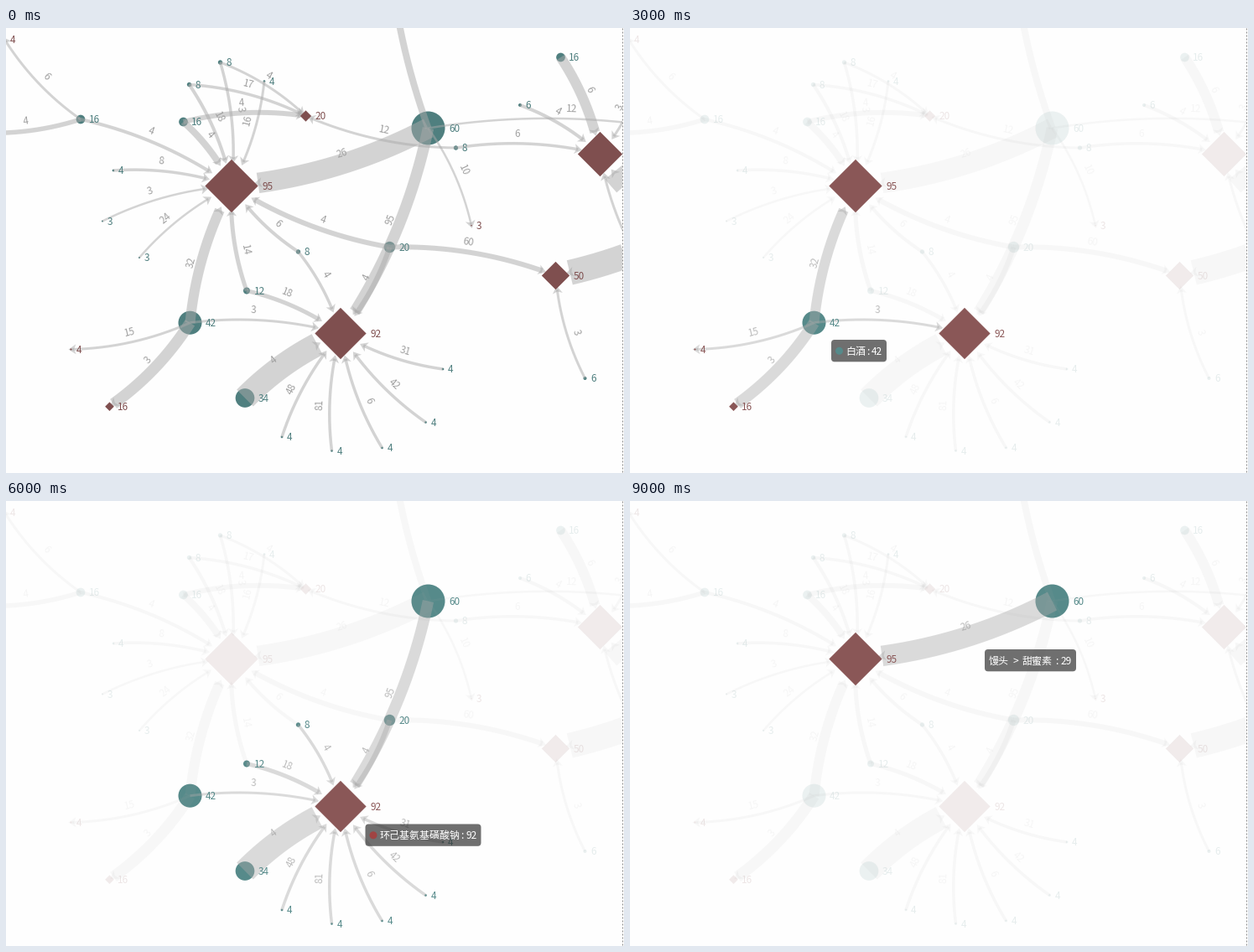
A matplotlib script for the animation above (10 s loop, 737 by 531 pixels).

```python
import numpy as np
import matplotlib.pyplot as plt
from matplotlib.animation import FuncAnimation
from matplotlib.patches import Circle, FancyBboxPatch, Polygon, Rectangle

W, H, DPI = 737, 531, 100
PT = 72 / DPI
FONT = "Noto Sans CJK JP"
BACK = "#fefefe"
CURVE = 0.1
GREY = "#aaaaaa"

# key: x, y, value; capitals are foods (circles), small letters additives (diamonds)
NODES = {
    "A": (503.5, 119.5, 60), "B": (219.5, 351.7, 42), "C": (285, 441.5, 34),
    "D": (457.5, 261.5, 20), "E": (211.5, 112, 16), "F": (89, 109, 16),
    "G": (287, 313.5, 12), "H": (348.5, 267, 8), "I": (255.5, 41, 8),
    "J": (218.5, 67.5, 8), "K": (308, 63.5, 4), "L": (128, 170, 4),
    "M": (115, 230.5, 3), "N": (159, 274, 3), "O": (329, 488, 4),
    "P": (388.5, 504.5, 4), "Q": (448.5, 501, 4), "R": (500.5, 470.5, 4),
    "S": (521, 407, 4), "T": (536.5, 143, 8), "U": (613, 92, 6),
    "V": (661.5, 35, 16), "W": (690.5, 418, 6), "X": (755, 68, 6),
    "Y": (800, 240, 60), "Z": (762, 290, 4),
    "a": (269, 188.5, 95), "b": (399, 364.5, 92), "c": (655.5, 295.5, 50),
    "d": (357.5, 105, 20), "e": (708.5, 150.5, 80), "f": (77.5, 383.5, 4),
    "g": (123.5, 451.7, 16), "h": (555, 235.7, 3), "i": (-1.5, 14, 4),
    "j": (455, -200, 16), "k": (-45, 124, 16), "l": (850, 132, 16),
    "m": (870, 205, 50),
}

# ends, line width, label
EDGES = [
    ("Aa", 24.5, 26), ("Ab", 13.5, 95), ("Ah", 2.5, 10), ("Aj", 8, 9),
    ("Al", 2.5, 12), ("Ba", 12, 32), ("Bb", 3, 3), ("Bf", 3, 15),
    ("Bg", 13.5, 3), ("Cb", 28, 4), ("Da", 6, 4), ("Db", 6, 4),
    ("Dc", 6, 60), ("Ea", 8, 4), ("Ed", 6, 4), ("Fa", 4, 4),
    ("Fi", 3, 6), ("Fk", 5.5, 4), ("Ga", 5, 14), ("Gb", 5, 18),
    ("Ha", 4, 6), ("Hb", 3.5, 4), ("Ia", 3.5, 3), ("Id", 3, 4),
    ("Ja", 4, 18), ("Jd", 3.5, 17), ("Ka", 3, 16), ("La", 3.5, 8),
    ("Ma", 2.5, 3), ("Na", 2.5, 24), ("Ob", 3.5, 48), ("Pb", 3.5, 81),
    ("Qb", 3.5, 6), ("Rb", 3.5, 42), ("Sb", 3.5, 31), ("Td", 3, 12),
    ("Te", 3.5, 6), ("Ue", 4, 4), ("Ve", 12, 6), ("Wc", 3, 3),
    ("Xe", 3, 3), ("Ye", 26, 8), ("Ze", 3, 5), ("mc", 30, 7),
]

NAMES = {"A": "馒头", "B": "白酒", "C": "蜜饯",
         "a": "甜蜜素", "b": "环己基氨基磺酸钠", "g": "塑化剂"}

# hovered node or edge, tooltip corner, tooltip value; one per second
STEPS = [
    ("", 0, 0, 0),
    ("a", 283, 210, 95),
    ("Ba", 256, 291, 14),
    ("B", 240, 372, 42),
    ("Bg", 192, 427, 16),
    ("Cb", 345, 420, 31),
    ("b", 428.5, 385.5, 92),
    ("Ab", 461, 300, 16),
    ("A", 521, 140, 60),
    ("Aa", 423, 177, 29),
]

fig = plt.figure(figsize=(W / DPI, H / DPI), dpi=DPI, facecolor=BACK)
ax = fig.add_axes([0, 0, 1, 1])


def write(x, y, s, color, size=11.8, **kw):
    ax.text(x, y, s, color=color, fontsize=size * PT, family=FONT,
            va="baseline", **kw)


def radius(key):
    return NODES[key][2] / 3


def bend(ends):
    """Points of the quadratic link, cut off at the rim of its end node."""
    p, q = (np.array(NODES[k][:2], float) for k in ends)
    dx, dy = q - p
    ctrl = (p + q) / 2 + CURVE * np.array([dy, -dx])
    t = np.linspace(0, 1, 400)[:, None]
    pts = (1 - t) ** 2 * p + 2 * t * (1 - t) * ctrl + t ** 2 * q
    far = np.hypot(*(pts - q).T) > radius(ends[1])
    return pts[far]


PATHS = {ends: bend(ends) for ends, _, _ in EDGES}


def draw_edge(ends, width, alpha):
    pts = PATHS[ends]
    ax.plot(*pts.T, color=GREY, alpha=alpha, lw=width * PT,
            solid_capstyle="butt")
    tip = pts[-1]
    u = tip - pts[-6]
    u = u / np.hypot(*u)
    n = np.array([-u[1], u[0]])
    shape = [tip + 4.5 * u, tip - 4.5 * u + 6 * n,
             tip - 2.2 * u, tip - 4.5 * u - 6 * n]
    ax.add_patch(Polygon(shape, fc=GREY, ec="none", alpha=alpha))


def draw_edge_label(ends, label, alpha):
    pts = PATHS[ends]
    m = len(pts) // 2
    u = pts[m + 3] - pts[m - 3]
    u = u / np.hypot(*u)
    if NODES[ends[1]][0] < NODES[ends[0]][0]:
        u = -u
    x, y = pts[m] + 8.2 * np.array([u[1], -u[0]])
    write(x, y, str(label), "#a2a2a2", ha="center", alpha=alpha,
          rotation=np.degrees(np.arctan2(-u[1], u[0])),
          rotation_mode="anchor")


def node_color(key, hover):
    if key.isupper():
        return "#568a8a" if hover else "#4f7f7f"
    return "#8a5757" if hover else "#7f4f4f"


def draw_node(key, hover, lit):
    x, y, value = NODES[key]
    r = radius(key)
    color = node_color(key, hover)
    alpha = 1 if lit else 0.11
    if key.isupper():
        shape = Circle((x, y), r, fc=color, ec="none", alpha=alpha)
    else:
        rim = [(x, y - r), (x + r, y), (x, y + r), (x - r, y)]
        shape = Polygon(rim, fc=color, ec="none", alpha=alpha)
    ax.add_patch(shape)
    write(x + r + 4.6, y + 4.2, str(value), color, alpha=1 if lit else 0.14)


def draw_tip(hover, x, y, value):
    names = [NAMES[k] for k in hover]
    single = len(names) == 1
    pen = x + (17 if single else 5)
    parts = [(pen, names[0])]
    pen += 12 * len(names[0])
    if single:
        parts += [(pen + 1, ":"), (pen + 7, str(value))]
        pen += 20
    else:
        parts += [(pen + 4.5, ">"), (pen + 16, names[1])]
        pen += 16 + 12 * len(names[1])
        parts += [(pen + 3, ":"), (pen + 9.7, str(value))]
        pen += 23
    ax.add_patch(FancyBboxPatch(
        (x + 4, y + 4), pen + 5 - x - 8, 18.3, fc="#323232", ec="none",
        alpha=0.7, boxstyle="round,pad=4,rounding_size=4", zorder=8))
    if single:
        dot = "#568a8a" if hover.isupper() else "#a04443"
        ax.add_patch(Circle((x + 9.5, y + 13.3), 4.5, fc=dot, ec="none",
                            zorder=9))
    for px, s in parts:
        write(px, y + 17.6, s, "white", 12, zorder=9)


def draw(frame):
    hover, x, y, value = STEPS[frame]
    ax.clear()
    ax.set(xlim=(0, W), ylim=(H, 0))
    ax.axis("off")

    lit_edges = {e for e, _, _ in EDGES if hover in e}
    lit_nodes = set("".join(lit_edges))
    bright = 0.42 if hover else 0.5
    for ends, width, _ in EDGES:
        draw_edge(ends, width, bright if ends in lit_edges else 0.08)
    for ends, _, label in EDGES:
        draw_edge_label(ends, label,
                        (0.7 if hover else 1) if ends in lit_edges else 0.09)
    for key in NODES:
        draw_node(key, bool(hover), key in lit_nodes)
    if hover:
        draw_tip(hover, x, y, value)

    ax.add_patch(Rectangle((735, 0), 2, H, fc=BACK, ec="none", zorder=10))
    ax.plot([735.5, 735.5], [0, H], color="#8c8c8c", lw=PT, zorder=11,
            dashes=(2, 2), dash_capstyle="butt")
    return []


anim = FuncAnimation(fig, draw, frames=len(STEPS), interval=1000,
                     init_func=lambda: [], repeat=True, repeat_delay=0)
plt.show()
```
